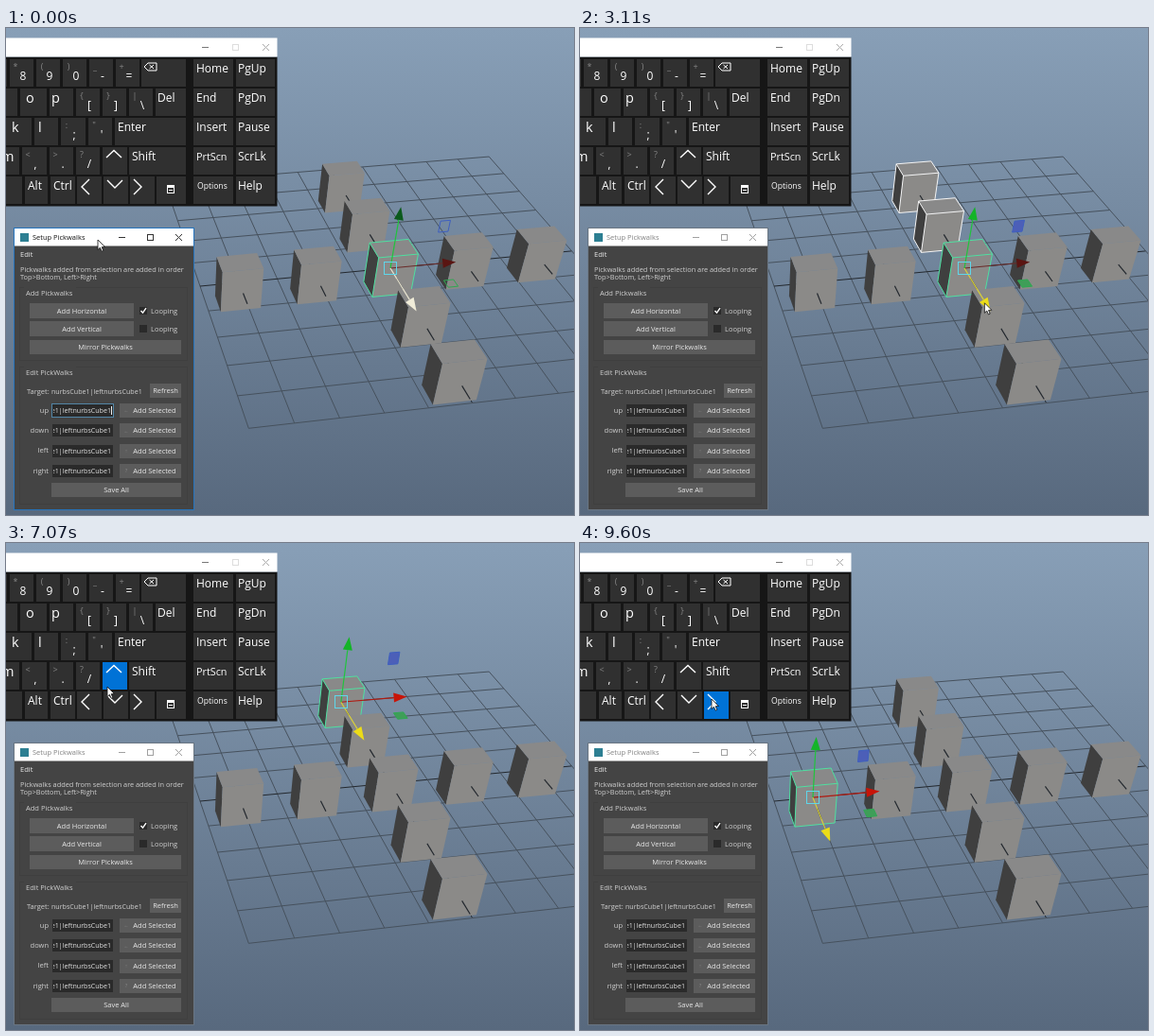
An HTML page with a canvas that plays this animation: 600x515 px, repeating every 9650 ms.

```html
<!DOCTYPE html>
<html>
<head>
<meta charset="utf-8">
<style>
html, body { margin: 0; height: 100%; overflow: hidden; background: #586a80; }
canvas { display: block; }
</style>
</head>
<body>
<canvas id="stage" width="600" height="515"></canvas>
<script>
const ctx = document.getElementById('stage').getContext('2d');
const LOOP = 9650, FIRST_CLICK = 860;
const FONT = '"Open Sans", "Noto Sans", sans-serif';

// Cursor stops: time, x, y
const path = [
  [0, 97, 224], [630, 97, 224], [860, 246, 270], [1000, 327, 263], [1140, 406, 257],
  [1280, 484, 248], [1430, 560, 240], [1480, 560, 240], [1710, 98, 296], [1950, 98, 296],
  [2320, 355, 170], [2480, 355, 170], [2720, 380, 209], [2960, 406, 257], [3200, 437, 306],
  [3420, 473, 366], [3520, 473, 366], [3820, 85, 318], [4060, 85, 318], [4260, 92, 328],
  [4420, 92, 328], [4850, 410, 262], [4950, 410, 262], [5400, 160, 172], [5460, 160, 172],
  [5550, 112, 168], [6040, 112, 168], [6150, 107, 152], [7280, 107, 152], [7420, 112, 168],
  [7900, 112, 168], [8040, 139, 165], [LOOP, 139, 165]
];
// Selected cubes over time; the last digit is the active one
const selections = [
  [0, '2'], [870, '0'], [1010, '01'], [1150, '012'], [1290, '0123'], [1440, '01234'],
  [2400, '5'], [2730, '56'], [2970, '562'], [3210, '5627'], [3430, '56278'],
  [4880, '2'], [5590, '7'], [5840, '8'], [6200, '7'], [6480, '2'], [6760, '6'], [7030, '5'],
  [7480, '6'], [7760, '2'], [8090, '3'], [8350, '4'], [8620, '0']
];
// Cubes on the ground plane: u to the right, v towards the viewer
const cubes = [[-4, 0], [-2, 0], [0, 0], [2, 0], [4, 0], [0, -4], [0, -2], [0, 2], [0, 4]];
const drawOrder = [5, 6, 0, 1, 2, 3, 4, 7, 8];
const half = [.52, .33, .48];

const depth = (u, v, h) => 1 + .00478 * u - .031 * v - .0316 * h;
function project(u, v, h = 0) {
  const w = depth(u, v, h);
  return [(406 + 41.18 * u + 2.07 * v - 5.37 * h) / w, (254 - 2.5 * u + 16.22 * v - 51 * h) / w];
}

function shape(points, fill, stroke, width = 1, close = true) {
  ctx.beginPath();
  points.forEach(p => ctx.lineTo(...p));
  if (close) ctx.closePath();
  if (fill) { ctx.fillStyle = fill; ctx.fill(); }
  if (stroke) { ctx.strokeStyle = stroke; ctx.lineWidth = width; ctx.stroke(); }
}
const line = (points, color, width) => shape(points, null, color, width, false);
function rect(x, y, w, h, fill) { ctx.fillStyle = fill; ctx.fillRect(x, y, w, h); }
function frame(x, y, w, h, color) {
  ctx.strokeStyle = color; ctx.lineWidth = 1; ctx.strokeRect(x + .5, y + .5, w - 1, h - 1);
}
function text(s, x, y, color = '#d0d0d0', size = 7.5, align = 'left') {
  ctx.font = size + 'px ' + FONT;
  ctx.textAlign = align; ctx.textBaseline = 'alphabetic';
  ctx.fillStyle = color;
  ctx.fillText(s, x, y + size * .36);
}

function drawGrid() {
  for (let i = -5; i <= 5; i++) {
    const color = i ? '#46515d' : '#23282e';
    line([project(-5, i), project(5, i)], color);
    line([project(i, -5), project(i, 5)], color);
  }
}

function drawCube([u, v], outline) {
  const [su, sv, sh] = half;
  const p = (a, b, c) => project(u + a * su, v + b * sv, c * sh);
  const top = [p(-1, -1, 1), p(1, -1, 1), p(1, 1, 1), p(-1, 1, 1)];
  const low = [p(-1, -1, -1), p(1, 1, -1), p(-1, 1, -1)];
  shape([top[0], top[3], low[2], low[0]], '#3f3f3f');
  shape(top, '#898989');
  shape([top[3], top[2], low[1], low[2]], '#8b8a88');
  line([project(u, v + .45), project(u, v + .88)], '#23282e', 1.2);
  if (outline) {
    shape([top[0], top[1], top[2], low[1], low[2], low[0]], null, outline);
    line([top[0], top[3], top[2]], outline);
    line([top[3], low[2]], outline);
  }
}

function drawArrow(from, to, color, shaft = color) {
  const dx = to[0] - from[0], dy = to[1] - from[1], n = Math.hypot(dx, dy);
  const x = dx / n, y = dy / n, bx = to[0] - 14 * x, by = to[1] - 14 * y;
  line([from, [bx, by]], shaft, 1.2);
  shape([to, [bx - 5 * y, by + 5 * x], [bx + 5 * y, by - 5 * x]], color);
}

function drawManipulator([u, v], muted, fresh) {
  const k = depth(u, v, 0), at = (a, b, c) => project(u + a * k, v + b * k, c * k);
  const o = at(0, 0, 0), q = .13;
  const corners = [[-q, -q], [q, -q], [q, q], [-q, q]];
  shape(corners.map(([a, c]) => at(1.25 + a, 0, .9 + c)), fresh ? null : '#4c5fb8', '#3e5fc0');
  shape(corners.map(([a, b]) => at(1.28 + a, .85 + b * 1.1, 0)), fresh ? null : '#3f9e58', '#2fa852');
  drawArrow(o, at(1.78, 0, 0), muted ? '#5a1512' : '#c81408', muted ? '#6a2a28' : '#b01a10');
  drawArrow(o, at(0, 1.78, 0), fresh ? '#f0ecd8' : '#ecdc18', fresh ? '#e8e4d0' : '#d8cf3a');
  drawArrow(o, at(0, 0, 1.44), fresh ? '#0b5a1c' : '#14b428', '#1fc43c');
  frame(Math.round(o[0]) - 7, Math.round(o[1]) - 7, 14, 14, '#5fd6ea');
}

// Keys: x, width, label, shifted label or text offset
const rows = [
  [[-25, 26, ''], [4, 25, '8', '*'], [32, 25, '9', '('], [60, 25, '0', ')'], [88, 25, '-', '_'],
   [116, 25, '=', '+'], [143, 47, 'back'], [198, 42, 'Home', 3], [243, 41, 'PgUp', 2]],
  [[-12, 24, ''], [15, 28, 'o', 6], [46, 25, 'p', 2], [74, 25, '[', '{'], [102, 25, ']', '}'],
   [130, 25, '\\', '|'], [158, 32, 'Del', 2], [198, 42, 'End', 3], [243, 41, 'PgDn', 2]],
  [[-2, 29, 'k', 8], [30, 25, 'l', 4], [58, 26, ';', ':'], [87, 25, "'", '"'],
   [115, 75, 'Enter', 3], [198, 42, 'Insert', 3], [243, 41, 'Pause', 2]],
  [[-12, 26, 'm', 7], [17, 26, ',', '<'], [46, 25, '.', '>'], [74, 25, '/', '?'], [102, 26, 'up'],
   [130, 60, 'Shift', 3], [198, 42, 'PrtScn', 3], [243, 41, 'ScrLk', 2]],
  [[-12, 29, ''], [20, 24, 'Alt', 3], [47, 26, 'Ctrl', 3], [75, 26, 'left'], [103, 26, 'down'],
   [131, 26, 'right'], [159, 31, 'menu'], [198, 42, 'Options', 4], [243, 41, 'Help', 2]]
];
const icons = {
  up: y => line([[106, y + 11], [114, y + 3.5], [122, y + 11]], '#fff', 1.4),
  left: y => line([[88, y + 3], [80, y + 11], [88, y + 19]], '#fff', 1.4),
  down: y => line([[107, y + 4], [115, y + 12], [123, y + 4]], '#fff', 1.4),
  right: y => line([[135, y + 3], [143, y + 11], [135, y + 19]], '#fff', 1.4),
  back: y => {
    shape([[146, y + 8], [150, y + 4], [159, y + 4], [159, y + 12], [150, y + 12]], null, '#fff');
    line([[151.5, y + 6], [156, y + 10]], '#fff');
    line([[156, y + 6], [151.5, y + 10]], '#fff');
  },
  menu: (y, hot) => {
    const c = hot ? '#111' : '#fff';
    frame(170, y + 9, 8, 9, c);
    rect(171, y + 10, 6, 2, c);
    rect(172, y + 14, 4, 1, c);
  }
};

function windowButtons(x, y, step, colors) {
  line([[x, y + .5], [x + 7, y + .5]], colors[0]);
  frame(x + step, y - 3, 7, 7, colors[1]);
  const cx = x + 2 * step;
  line([[cx, y - 3], [cx + 7, y + 4]], colors[2]);
  line([[cx + 7, y - 3], [cx, y + 4]], colors[2]);
}

function drawKeyboard(mx, my) {
  rect(0, 30.5, 286.5, 158, '#161616');
  rect(0, 10.5, 286.5, 20, '#fff');
  windowButtons(207, 20, 32, ['#777', '#ddd', '#aaa']);
  rows.forEach((keys, i) => {
    const y = 33 + i * 31;
    keys.forEach(([x, w, label, extra]) => {
      const icon = icons[label];
      const hot = icon && mx >= x && mx < x + w && my >= y && my < y + 29;
      rect(x, y, w, 29, hot ? (label === 'menu' ? '#ececec' : '#0072d6') : '#303030');
      if (icon) icon(y, hot);
      else if (typeof extra === 'string') {
        text(extra, x + 6, y + 8, '#858585', 9, 'center');
        text(label, x + 14, y + 18, '#fff', 12, 'center');
      } else if (label) {
        const size = label.length === 1 ? 14.5 : label === 'Options' ? 8.6 : label === 'PrtScn' ? 10.8 : 12;
        text(label, x + extra, y + 10, '#fff', size);
      }
    });
  });
}

function drawPanel(mx, my, focused) {
  const button = (x, y, w, h, label, tx = x + w / 2) => {
    const hot = mx >= x && mx < x + w && my >= y - 2 && my < y + h;
    rect(x, y, w, h, hot ? '#707070' : '#5c5c5c');
    text(label, tx, y + h / 2, '#e8e8e8', 7.5, 'center');
  };
  const group = (y, h, label) => {
    frame(14, y, 178, h, '#3f3f3f');
    rect(19, y, 55, 2, '#444');
    text(label, 21, y + 6);
  };
  const looping = (y, on) => {
    rect(141, y - 4, 8, 8, '#2a2a2a');
    if (on) line([[142.5, y], [144.5, y + 2.2], [148, y - 2.8]], '#fff', 1.4);
    text('Looping', 153, y);
  };
  rect(9, 212, 189, 297, '#444');
  rect(9, 212, 189, 18.5, '#fff');
  frame(8, 211, 191, 299, focused ? '#2674bd' : '#697582');
  rect(15, 217, 9, 9, '#2d7f92');
  text('Setup Pickwalks', 28, 221.5, focused ? '#111' : '#808080');
  const c = focused ? '#333' : '#a0a0a0';
  windowButtons(119, 221, 30, [c, c, c]);

  text('Edit', 15, 239, '#eee');
  text('Pickwalks added from selection are added in order', 15, 255, '#d0d0d0', 7.35);
  text('Top>Bottom, Left>Right', 15, 263.5, '#d0d0d0', 7.35);
  group(274, 78, 'Add Pickwalks');
  button(25, 291, 110, 16, 'Add Horizontal');
  button(25, 310, 110, 16, 'Add Vertical');
  button(25, 330, 160, 15, 'Mirror Pickwalks');
  looping(299, true);
  looping(318, false);

  group(358, 146, 'Edit PickWalks');
  text('Target:', 22, 384);
  text('nurbsCube1|leftnurbsCube1', 48, 384, '#d0d0d0', 7.1);
  button(152, 376, 33, 15, 'Refresh');
  ['up', 'down', 'left', 'right'].forEach((name, i) => {
    const y = 404.5 + i * 21.3, top = Math.round(y - 6.5);
    text(name, 45, y - .5, '#d0d0d0', 7.5, 'right');
    rect(49, top, 64, 13, '#2a2a2a');
    ctx.save();
    ctx.beginPath(); ctx.rect(50, top, 62, 13); ctx.clip();
    text('nurbsCube1|leftnurbsCube1', 111, y, '#e0e0e0', 7.1, 'right');
    ctx.restore();
    if (focused && !i) {
      frame(48, top - 1, 66, 15, '#5285a6');
      rect(111, top + 2, 1, 9, '#eee');
    }
    button(120, top - 1, 65, 15, 'Add Selected', 157);
    text(['←', '←', '↑', '?'][i], 127, y, '#8c8c8c', 5, 'center');
  });
  button(48, 481, 137, 15, 'Save All');
}

function cursorAt(t) {
  const i = Math.max(1, path.findIndex(p => p[0] >= t));
  const a = path[i - 1], b = path[i];
  const f = (t - a[0]) / (b[0] - a[0]), e = f * f * (3 - 2 * f);
  return [a[1] + (b[1] - a[1]) * e, a[2] + (b[2] - a[2]) * e];
}
function drawCursor(x, y) {
  const arrow = [[0, 0], [0, 10.5], [2.4, 8.3], [4.1, 12.2], [5.8, 11.4], [4.2, 7.7], [7.5, 7.5]];
  shape(arrow.map(p => [x + p[0], y + p[1]]), '#fff', '#111', .8);
}

const sky = ctx.createLinearGradient(0, 0, 0, 515);
sky.addColorStop(0, '#889fb7');
sky.addColorStop(1, '#58697e');

function draw(now) {
  const t = now % LOOP;
  const [mx, my] = cursorAt(t);
  const chosen = selections.filter(s => s[0] <= t).pop()[1];
  const active = +chosen.slice(-1);
  const fresh = t < FIRST_CLICK;

  rect(0, 0, 600, 515, sky);
  drawGrid();
  drawOrder.forEach(i => drawCube(cubes[i],
    i === active ? '#4fe0a0' : chosen.includes(i) ? '#f4f4f4' : null));
  drawManipulator(cubes[active], fresh || chosen.length > 1, fresh);
  drawKeyboard(mx, my);
  drawPanel(mx, my, fresh);
  drawCursor(mx, my);
  requestAnimationFrame(() => draw(performance.now()));
}
draw(performance.now());
</script>
</body>
</html>
```
